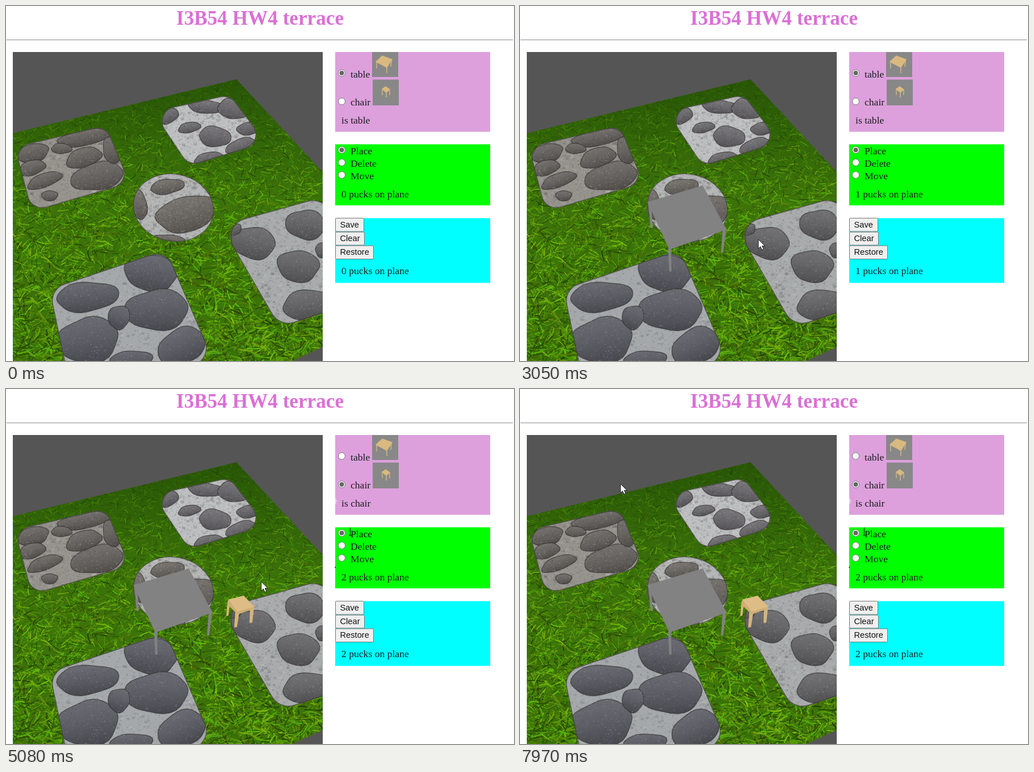
Recreate the animation shown at these times as an HTML page with a canvas. Size 895 by 625 pixels, loop 8000 ms.

```html
<!DOCTYPE html>
<html lang="en">
<head>
<meta charset="utf-8">
<title>Terrace</title>
<style>
html, body { margin: 0; width: 100%; height: 100%; overflow: hidden; background: #fff; }
canvas, svg { position: absolute; left: 0; top: 0; }
text { font: 17.6px "Liberation Serif", "Times New Roman", serif; fill: #1c1c1c; }
h1, .title { font-size: 35.2px; font-weight: bold; fill: #da70d6; text-anchor: middle; }
.button { font: 14.67px "Liberation Sans", Arial, sans-serif; fill: #111; }
.box { fill: #efefef; stroke: #767676; }
.radio { fill: #fff; stroke: #767676; }
.dot { fill: #666; }
.wood { fill: #d9b980; stroke: #d9b980; }
</style>
</head>
<body>
<canvas id="scene" width="895" height="625"></canvas>
<svg width="895" height="625" viewBox="0 0 895 625">
  <text class="title" x="447.5" y="33">I3B54 HW4 terrace</text>
  <path d="M1 59.5H893" stroke="#9a9a9a"/>
  <path d="M1 60.5H893" stroke="#eee"/>

  <rect x="580" y="81" width="273" height="140.5" fill="#dda0dd"/>
  <rect x="580" y="243.5" width="273" height="107.5" fill="#0f0"/>
  <rect x="580" y="373.5" width="273" height="114" fill="#0ff"/>

  <path d="M645 81h46v44h-46zM646 129.500h46v45.500h-46z" fill="#888"/>
  <g class="wood" stroke-width="1.4">
    <path d="M652 98L663 88L680 94L671 108Z"/>
    <path d="M653 99V110M671 108V118M679 95L678 107" fill="none"/>
    <path d="M663 146L669 142L676 147L670 152Z"/>
    <path d="M663 147V157M670 152V161M676 148V157" fill="none"/>
  </g>

  <circle class="radio" cx="591.5" cy="118" r="6"/>
  <circle class="radio" cx="591.5" cy="168" r="6"/>
  <circle class="radio" cx="591.5" cy="253.5" r="6"/>
  <circle class="radio" cx="591.5" cy="275.500" r="6"/>
  <circle class="radio" cx="591.5" cy="297.500" r="6"/>
  <circle class="dot" id="choice" cx="591.5" cy="118" r="4"/>
  <circle class="dot" cx="591.5" cy="253.5" r="4"/>

  <text x="607" y="126">table</text>
  <text x="607" y="175">chair</text>
  <text x="591" y="207" id="kind">is table</text>
  <text x="607" y="261">Place</text>
  <text x="607" y="283">Delete</text>
  <text x="607" y="305">Move</text>
  <text x="591" y="336.500" class="count"></text>
  <text x="591" y="472" class="count"></text>

  <rect class="box" x="580.5" y="373.5" width="50" height="23.500" rx="2"/>
  <rect class="box" x="580.5" y="398" width="51" height="23" rx="2"/>
  <rect class="box" x="580.5" y="422" width="67" height="23.500" rx="2"/>
  <text class="button" x="588.5" y="390">Save</text>
  <text class="button" x="588.5" y="414">Clear</text>
  <text class="button" x="588.5" y="438">Restore</text>

  <g id="trail">
    <path d="M606.5 244V257M604 257.500H610" stroke="#143c14" stroke-width="1.3"/>
    <path d="M580 191l4 7h-2v5l-2-2z" fill="#ecc9ec"/>
    <rect x="579.5" y="313" width="1.500" height="2" fill="#222"/>
  </g>

  <g id="table" fill="#828282">
    <path d="M226 345l5 1 3 45h-4zM357 394l6-1-5 41h-4zM261 427h5l1 40-4 1z"/>
    <path d="M224.500 345L322 316L364 393.500L263 429Z"/>
  </g>
  <g id="chair">
    <path d="M390 376l4 3-2 20-4 1zM404 392l7 1-4 26-5 1zM430 386l7-2-3 27-5 1z" fill="#d5b57c"/>
    <path d="M391 372L418 364L437.500 383L436 387L408 397L390 379Z" fill="#d0ae74"/>
    <path d="M392 370.500L418.500 364L437.500 383L408 392Z" fill="#ddbd85"/>
  </g>

  <g id="pointer">
    <circle id="press" r="13" cx="-.5" cy="-.5" fill="rgba(196,186,30,.78)"/>
    <path d="M0 0V16L3.700 12.600L6.200 18.300L9 17L6.500 11.600H11.500Z" fill="#fff" stroke="#111" stroke-width=".9"/>
  </g>
</svg>

<script>
const $ = id => document.getElementById(id);
const ctx = $('scene').getContext('2d');

let seed = 54;
function rand(min = 0, max = 1) {
  seed = (seed * 1664525 + 1013904223) % 4294967296;
  return min + (max - min) * seed / 4294967296;
}

function polygon(points) {
  ctx.beginPath();
  points.forEach(([x, y]) => ctx.lineTo(x, y));
  ctx.closePath();
}

function roundPolygon(points, radius) {
  const [a, b] = points;
  ctx.beginPath();
  ctx.moveTo((a[0] + b[0]) / 2, (a[1] + b[1]) / 2);
  for (let i = 1; i <= points.length; i++) {
    const p = points[i % points.length], q = points[(i + 1) % points.length];
    ctx.arcTo(...p, ...q, radius);
  }
  ctx.closePath();
}

function grass() {
  ctx.save();
  polygon([[12, 224], [406, 129], [558, 292], [558, 600], [505, 625], [12, 625]]);
  ctx.clip();
  ctx.fillStyle = '#3b730a';
  ctx.fillRect(12, 120, 546, 505);
  ctx.lineCap = 'round';
  for (let i = 0; i < 9000; i++) {
    const x = rand(12, 558), y = rand(125, 630), near = (y - 120) / 505;
    const size = .35 + .85 * near, length = size * rand(9, 29), angle = rand(0, 6.283);
    const dx = Math.cos(angle) * length, dy = Math.sin(angle) * length * .75;
    const bend = rand(-.2, .2);
    ctx.strokeStyle = `hsl(${rand(78, 96)} ${rand(80, 95)}% ${rand(13, 40)}%)`;
    ctx.lineWidth = size * rand(.8, 2.300);
    ctx.beginPath();
    ctx.moveTo(x, y);
    ctx.quadraticCurveTo(x + dx / 2 - dy * bend, y + dy / 2 + dx * bend, x + dx, y + dy);
    ctx.stroke();
  }
  const shade = ctx.createLinearGradient(0, 130, 0, 330);
  shade.addColorStop(0, 'rgba(10,40,0,.4)');
  shade.addColorStop(1, 'rgba(10,40,0,0)');
  ctx.fillStyle = shade;
  ctx.fillRect(12, 120, 546, 210);
  ctx.restore();
}

function specks(count, [x, y, w, h], maxSize, alpha) {
  for (let i = 0; i < count; i++) {
    const v = rand(30, 225), size = rand(.6, maxSize);
    ctx.fillStyle = `rgba(${v},${v},${v},${alpha})`;
    ctx.fillRect(x + rand(0, w), y + rand(0, h), size * 1.300, size);
  }
}

function stone([cx, cy, rx, ry, turn], color) {
  const phase = rand(0, 6);
  ctx.save();
  ctx.translate(cx, cy);
  ctx.rotate(turn);
  ctx.beginPath();
  for (let a = 0; a < 6.28; a += .2) {
    const r = 1 + .05 * Math.sin(3 * a + phase) + .03 * Math.sin(5 * a - phase);
    ctx.lineTo(Math.cos(a) * rx * r, Math.sin(a) * ry * r);
  }
  ctx.closePath();
  ctx.fillStyle = color;
  ctx.fill();
  const light = ctx.createLinearGradient(0, -ry, 0, ry);
  light.addColorStop(0, 'rgba(255,255,255,.12)');
  light.addColorStop(1, 'rgba(0,0,0,.18)');
  ctx.fillStyle = light;
  ctx.fill();
  ctx.strokeStyle = 'rgba(45,42,40,.6)';
  ctx.lineWidth = 1.500;
  ctx.stroke();
  ctx.restore();
}

function tile(outline, bounds, mortar, color, stones) {
  ctx.save();
  outline();
  ctx.clip();
  ctx.fillStyle = mortar;
  ctx.fill();
  specks(700, bounds, 5, .18);
  stones.forEach(s => stone(s, color));
  specks(2600, bounds, 1.900, .2);
  outline();
  ctx.strokeStyle = 'rgba(60,58,56,.8)';
  ctx.lineWidth = 2.500;
  ctx.stroke();
  ctx.restore();
}

function drawScene() {
  ctx.beginPath();
  ctx.rect(12, 81, 546, 544);
  ctx.clip();
  ctx.fillStyle = '#555';
  ctx.fillRect(12, 81, 546, 544);
  grass();

  tile(() => roundPolygon([[15, 248], [176, 210], [218, 312], [45, 362]], 26),
    [18, 212, 196, 146], '#96938d', '#615d59', [
      [140, 231, 50, 14, -.2], [46, 259, 30, 16, -.2], [98, 251, 18, 9, 0],
      [46, 285, 24, 13, -.3], [137, 267, 32, 17, -.3], [68, 307, 32, 12, -.35],
      [161, 300, 47, 24, -.2], [77, 334, 14, 9, 0], [188, 254, 17, 24, -.3]]);

  tile(() => roundPolygon([[258, 186], [394, 156], [458, 240], [322, 282]], 26),
    [262, 157, 192, 122], '#bfc0c1', '#666468', [
      [352, 177, 32, 12, .1], [284, 193, 20, 14, -.3], [323, 214, 20, 9, -.2],
      [399, 181, 26, 18, .2], [368, 230, 28, 18, .1], [430, 215, 24, 11, -.2],
      [414, 246, 28, 12, -.3], [357, 268, 26, 10, -.2]]);

  tile(() => { ctx.beginPath(); ctx.ellipse(295, 355, 71.500, 59.500, .2, 0, 7); },
    [223, 293, 144, 124], '#b5b7b6', '#67625d', [
      [284, 318, 30, 13, -.15], [318, 366, 54, 31, -.25],
      [235, 350, 13, 27, -.15], [288, 411, 28, 8, .1]]);

  tile(() => roundPolygon([[378, 386], [558, 336], [650, 510], [482, 566]], 34),
    [387, 343, 172, 214], '#a9acac', '#5f5e60', [
      [436, 417, 39, 28, .15], [528, 385, 35, 26, .1], [515, 458, 37, 28, .1],
      [532, 526, 45, 26, -.1], [558, 430, 13, 13, 0], [402, 394, 14, 9, -.5]]);

  tile(() => roundPolygon([[76, 498], [282, 429], [363, 618], [125, 730]], 32),
    [78, 436, 276, 190], '#a4a8aa', '#56575f', [
      [143, 512, 55, 26, -.1], [256, 470, 47, 32, .1], [266, 535, 56, 36, -.05],
      [145, 588, 54, 40, -.15], [199, 548, 19, 21, .3], [310, 598, 44, 30, -.4],
      [220, 624, 38, 17, -.1]]);
}

// Pointer moves: start, end, target x, target y
const moves = [
  [260, 1030, 292, 411], [1430, 1650, 408, 439], [2310, 2380, 409, 417],
  [2710, 2850, 420, 411], [3050, 3820, 596, 170], [3960, 4170, 606, 250],
  [4170, 4660, 414, 400], [4870, 5430, 527, 208], [5780, 6400, 517, 210],
  [7210, 7970, 169, 166]
];
const presses = [1100, 3890, 4730, 5640, 6800];
const STEP = 70;

function pointerAt(t) {
  let x = 823, y = 610;
  for (const [start, end, tx, ty] of moves) {
    if (t < start) break;
    const k = Math.min(1, Math.floor((t - start) / STEP) / Math.round((end - start) / STEP));
    const e = k * k * (3 - 2 * k);
    x += (tx - x) * e;
    y += (ty - y) * e;
  }
  return [x, y];
}

const show = (id, on) => $(id).setAttribute('visibility', on ? 'visible' : 'hidden');

function frame(now) {
  const t = now % 8000;
  const isTable = t < 3960, pucks = (t >= 1170) + (t >= 4800);
  show('pointer', t >= 260);
  $('pointer').setAttribute('transform', `translate(${pointerAt(t)})`);
  $('press').setAttribute('opacity', +presses.some(p => t >= p && t < p + STEP));
  show('table', pucks > 0);
  show('chair', pucks > 1);
  show('trail', t >= 4170);
  $('choice').setAttribute('cy', isTable ? 118 : 168);
  $('kind').textContent = isTable ? 'is table' : 'is chair';
  document.querySelectorAll('.count').forEach(c => c.textContent = pucks + ' pucks on plane');
  requestAnimationFrame(frame);
}

drawScene();
requestAnimationFrame(frame);
</script>
</body>
</html>
```
